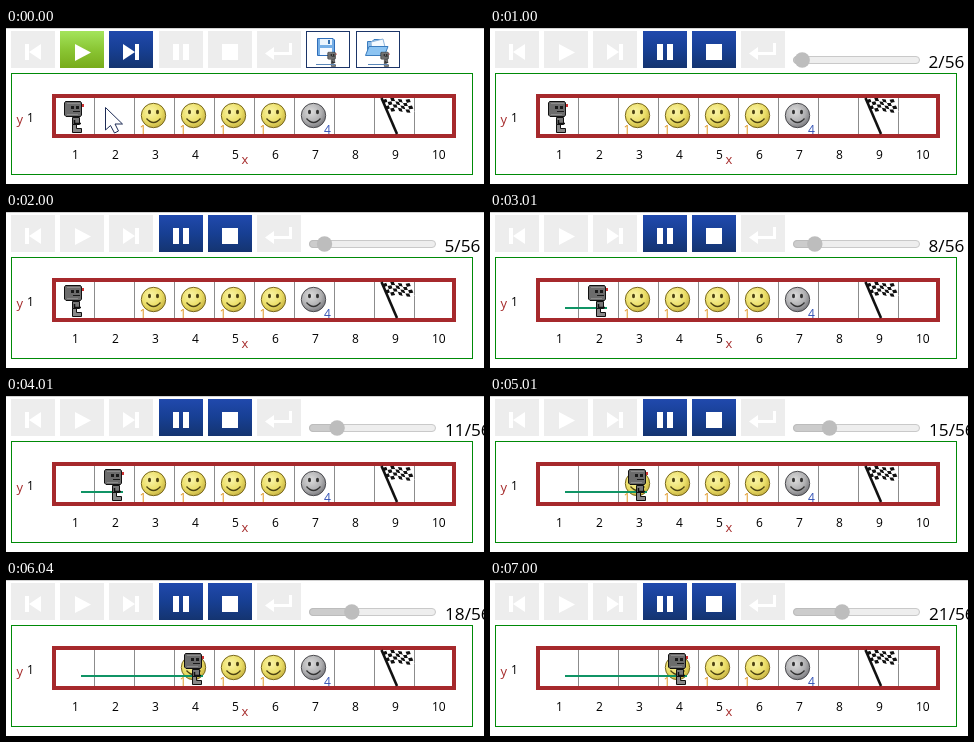
An HTML page for the animation above (8000 ms loop, 478 by 156 pixels).

```html
<!DOCTYPE html>
<html lang="en">
<head>
<meta charset="utf-8">
<title>Robot on a grid</title>
<style>
html, body { margin: 0; width: 100%; height: 100%; overflow: hidden; background: #fff; }
svg { display: block; width: 478px; height: 156px; }
text { font-family: "Open Sans", "Noto Sans", sans-serif; font-weight: 500; }
</style>
</head>
<body>
<svg id="stage" viewBox="0 0 478 156" xmlns="http://www.w3.org/2000/svg">
  <defs>
    <linearGradient id="green" x2="0" y2="1">
      <stop offset="0" stop-color="#a4e45c"/><stop offset=".5" stop-color="#8ac634"/><stop offset="1" stop-color="#78ab1a"/>
    </linearGradient>
    <linearGradient id="blue" x2="0" y2="1">
      <stop offset="0" stop-color="#2049ad"/><stop offset=".5" stop-color="#173f93"/><stop offset="1" stop-color="#143470"/>
    </linearGradient>
    <radialGradient id="gold" cx=".4" cy=".35" r=".7">
      <stop offset="0" stop-color="#faf5a8"/><stop offset=".6" stop-color="#ebde68"/><stop offset="1" stop-color="#c2ad3c"/>
    </radialGradient>
    <radialGradient id="grey" cx=".4" cy=".35" r=".7">
      <stop offset="0" stop-color="#dcdcdc"/><stop offset=".6" stop-color="#b0b0b2"/><stop offset="1" stop-color="#747478"/>
    </radialGradient>
    <g id="bot">
      <path d="M9.500 16.500H16.500V23.500H9.500z" fill="#777" stroke="#111"/>
      <path d="M2.500 .5H17.500L18.500 2V14L17.500 15.500H3L1.500 14V2z" fill="#6c6c6c" stroke="#111"/>
      <path d="M4 2.500h13M4 13.500h11" stroke="#8c8c8c"/>
      <path d="M8 5h3v3h-3zM13 5h3v3h-3zM10 10h7v1h-7z" fill="#191919"/>
      <path d="M19 3h2v3h-2z" fill="#c33"/>
      <path d="M11.500 19V22.500H18" fill="none" stroke="#111" stroke-width="1.500"/>
      <path d="M9.500 23.500h4v4H18.500V31.500H9.500z" fill="#888" stroke="#111"/>
    </g>
  </defs>
  <path d="M0 .5H478" stroke="#d2d2d2"/>
  <g id="bar"></g>
  <g id="files">
    <g fill="#fff" stroke="#1b3568">
      <rect x="300.500" y="3.500" width="43" height="36"/><rect x="350.500" y="3.500" width="43" height="36"/>
    </g>
    <path d="M311.500 10.500H327L328.500 12V27.500H311.500z" fill="#74aee6" stroke="#2f6db8"/>
    <path d="M314 11h12v6h-12z" fill="#eaf4fd"/><path d="M322 12h2v4h-2z" fill="#336fae"/>
    <path d="M314 20h12v7h-12z" fill="#f5f9ff"/>
    <path d="M361.500 26V13.500H366L368 11.500H376.500V26z" fill="#8bbce9" stroke="#3a7cbe"/>
    <path d="M365 14l12-3 3 12-14 3z" fill="#f4faff" stroke="#8db5dc"/>
    <path d="M359.500 27.500L363 18.500H382L378.500 27.500z" fill="#8cc4f2" stroke="#3a7cbe"/>
    <use href="#bot" transform="translate(321 24) scale(.46)"/>
    <use href="#bot" transform="translate(374 24) scale(.46)"/>
    <path d="M310 36.500h19M362 36.500h20" stroke="#5a86b8"/>
  </g>
  <g id="slider">
    <rect x="303.500" y="28.500" width="126" height="7" rx="3.500" fill="#eee" stroke="#c9c9c9"/>
    <rect id="done" x="303.500" y="28.500" height="7" rx="3.500" fill="#ccc" stroke="#bcbcbc"/>
    <circle id="knob" cy="32" r="7.700" fill="#bdbdbd"/>
    <text id="count" y="40" font-size="17.200"></text>
  </g>
  <rect x="5.500" y="45.500" width="461" height="101" fill="none" stroke="#008a08"/>
  <g id="board"></g>
  <g id="faces"></g>
  <g id="flag"></g>
  <path id="trail" fill="none" stroke="#109465" stroke-width="2"/>
  <use id="robot" href="#bot"/>
  <path id="pointer" d="M99.500 79.500V102L104.500 97.500L108.500 105L112.500 103L109 96H116.500z" fill="#fff" stroke="#1d2b55"/>
</svg>
<script>
const $ = id => document.getElementById(id);
const LOOP = 8000;

// start time, step shown (0 = stopped), cells travelled
const states = [
  [0, 0, 0], [1000, 2, 0], [2000, 5, 0], [3010, 8, 1],
  [4010, 11, 1], [5010, 15, 2], [6040, 18, 3], [7000, 21, 3]
];

const icons = [
  "M14 13h4v16h-4zM30 13v16l-12-8z",
  "M15 13l16 8.500-16 8.500z",
  "M14 13l12 8-12 8zM26 13h4v16h-4z",
  "M14 13h6v16h-6zM24 13h6v16h-6z",
  "M14 13h16v16h-16z",
  "M32 12h3v12H17v5l-9-6.500 9-6.500v5H32z"
];

function label(x, y, s, size, fill, anchor = "middle") {
  return `<text x="${x}" y="${y}" font-size="${size}" fill="${fill}" text-anchor="${anchor}">${s}</text>`;
}

function drawButtons() {
  $("bar").innerHTML = icons.map((d, i) =>
    `<g transform="translate(${Math.round(5 + i * 49.2)} 3)">` +
    `<rect class="key" width="44" height="37"/><path d="${d}" fill="#fff"/></g>`).join("");
}

function drawBoard() {
  let s = "";
  for (let i = 1; i <= 10; i++) {
    const x = 48.5 + i * 40;
    if (i < 10) s += `<path d="M${x} 70V106" stroke="#8c8c8c"/>`;
    s += label(26 + i * 40, 131, i, 12, "#000", "start");
  }
  s += '<rect x="48" y="68" width="400" height="40" fill="none" stroke="#a6292c" stroke-width="4"/>';
  s += label(10.5, 96, "y", 13, "#a52a2a", "start") + label(24.5, 94, 1, 12, "#000");
  $("board").innerHTML = s + label(239, 136, "x", 13, "#a52a2a");
}

function face(cell) {
  const last = cell === 7, x = 27.5 + cell * 40;
  const ink = last ? "#333" : "#4d4313";
  return `<g data-cell="${cell}"><g transform="translate(${x} 87.5)">` +
    `<circle r="12.200" fill="url(#${last ? "grey" : "gold"})" stroke="${last ? "#4c4c50" : "#786820"}"/>` +
    `<ellipse cx="-4" cy="-3.500" rx="1.500" ry="2.300" fill="${ink}"/>` +
    `<ellipse cx="4" cy="-3.500" rx="1.500" ry="2.300" fill="${ink}"/>` +
    `<path d="M-7 3Q0 11 7 3" fill="none" stroke="${ink}" stroke-width="1.300"/></g>` +
    (last ? label(x + 14, 106, 4, 12, "#3352b5") : label(x - 10.5, 106, 1, 12, "#e0951f")) + "</g>";
}

// Waving checkered cloth in unit coordinates
function cloth(u, v) {
  const wave = 1.5 * Math.sin(u * 5.5);
  return `${(376.5 + 27 * u + 5 * v).toFixed(1)} ${(72 - 2 * u + 13 * v - wave).toFixed(1)}`;
}

function drawFlag() {
  const cols = 7, rows = 4;
  let s = "";
  for (let i = 0; i < cols; i++) for (let j = 0; j < rows; j++) {
    const a = i / cols, b = (i + 1) / cols, c = j / rows, d = (j + 1) / rows;
    s += `<path d="M${cloth(a, c)}L${cloth(b, c)}L${cloth(b, d)}L${cloth(a, d)}z" fill="${(i + j) % 2 ? "#fff" : "#111"}"/>`;
  }
  $("flag").innerHTML = s + '<path d="M375.500 70L391 106" stroke="#111" stroke-width="2.600"/>';
}

function render(t) {
  const [, step, moved] = states.filter(s => s[0] <= t).pop();
  const running = step > 0;
  const shift = 40 * moved, knob = 308 + 2.1 * step;
  keys.forEach((k, i) => {
    const on = running ? i === 3 || i === 4 : i === 1 || i === 2;
    k.setAttribute("fill", !on ? "#ededed" : i === 1 ? "url(#green)" : "url(#blue)");
  });
  $("files").style.display = $("pointer").style.display = running ? "none" : "";
  $("slider").style.display = running ? "" : "none";
  $("knob").setAttribute("cx", knob);
  $("done").setAttribute("width", knob - 303.5);
  $("count").setAttribute("x", step < 10 ? 438.5 : 439);
  $("count").textContent = step + "/56";
  $("robot").setAttribute("transform", `translate(${57 + shift} 73)`);
  $("trail").setAttribute("d", moved ? `M75 96H${77 + shift}` : "");
  faces.forEach(f => {
    f.style.display = +f.dataset.cell < moved + 1 ? "none" : "";
  });
}

drawButtons();
drawBoard();
drawFlag();
$("faces").innerHTML = [3, 4, 5, 6, 7].map(face).join("");
const keys = [...document.querySelectorAll(".key")];
const faces = [...$("faces").children];

const start = performance.now();
function tick(now) {
  render(Math.max(0, now - start) % LOOP);
  requestAnimationFrame(tick);
}
render(0);
requestAnimationFrame(tick);
</script>
</body>
</html>
```
